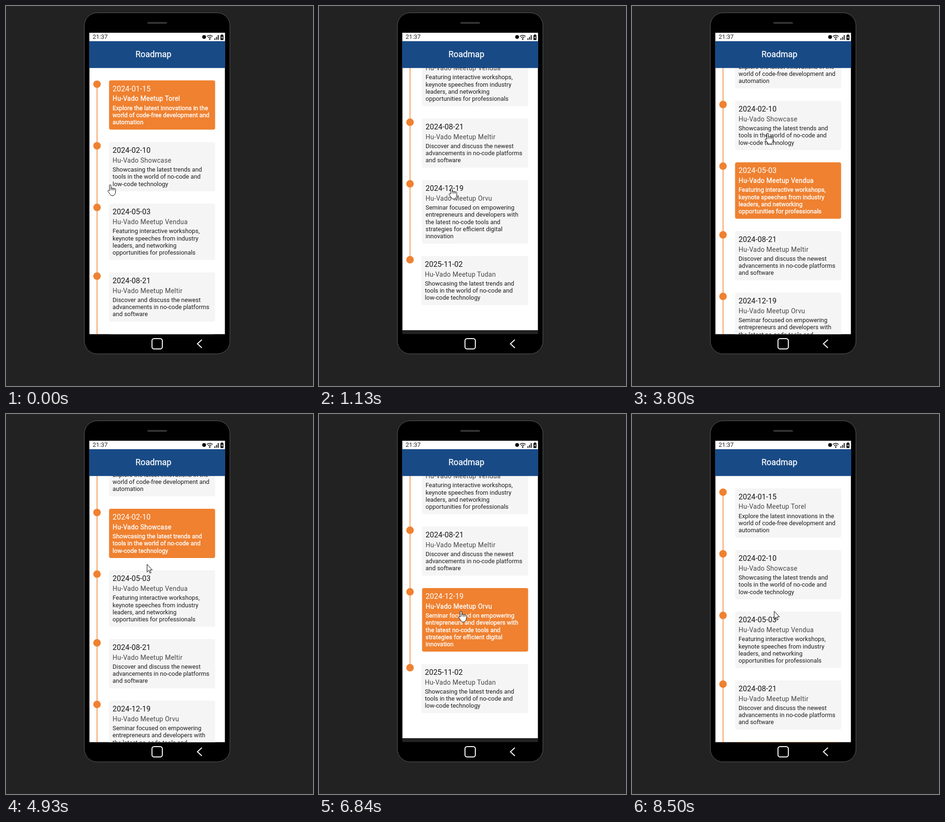
Animation, 654 px wide and 810 px high, one loop 8830 ms. Source, as an HTML page:

```html
<!DOCTYPE html>
<html lang="en">
<head>
<meta charset="utf-8">
<title>Roadmap</title>
<style>
  html, body { margin: 0; width: 100%; height: 100%; overflow: hidden; background: #222; }
  svg { display: block; font-family: Roboto, sans-serif; }
  .card rect { fill: #f5f5f5; }
  .date { font-size: 16px; fill: #181818; }
  .title { font-size: 14px; letter-spacing: .25px; fill: #484848; }
  .desc { font-size: 12.9px; fill: #1c1c1c; }
  .active rect { fill: #ef8130; }
  .active text { fill: #fff; }
  .active .title, .active .desc { stroke: #fff; stroke-width: .35px; }
  .cursor { fill: #fff; stroke: #000; stroke-linejoin: round; }
</style>
</head>
<body>
<svg width="654" height="810" viewBox="0 0 654 810">
  <defs><clipPath id="view"><rect x="177.5" y="132" width="289" height="567.4"/></clipPath></defs>

  <rect x="167" y="14.5" width="310" height="727" rx="27" stroke="#5c5c5c"/>
  <rect x="301" y="34" width="42" height="4" rx="2" fill="#333"/>
  <rect x="177.5" y="57" width="289" height="642.4" fill="#222"/>

  <g clip-path="url(#view)">
    <g id="page">
      <rect x="177.5" y="100" width="289" height="919" fill="#fff"/>
      <g id="timeline" fill="#ef8130"></g>
    </g>
  </g>

  <rect x="177.5" y="57" width="289" height="18.5" fill="#fff"/>
  <text x="184.5" y="70.3" font-size="12.9" fill="#222">21:37</text>
  <circle cx="422" cy="66" r="4"/>
  <g fill="none" stroke="#000" stroke-width="1.6">
    <path d="M428 65a8.6 8.6 0 0 1 12 0M430.6 67.7a5 5 0 0 1 6.8 0"/>
    <path d="M445 72v-3M448.5 72v-6M452 72v-10" stroke-width="1.8"/>
  </g>
  <circle cx="434" cy="70.2" r="1.5"/>
  <path d="M457 62h1.8v-1.5h2.6v1.5h1.8v10.5h-6.2z"/>
  <path d="M460.6 63.5l-2.2 4.2h1.5v3l2.2-4.2h-1.5z" fill="#fff"/>

  <rect x="177" y="75" width="290" height="57.2" fill="#184a86"/>
  <text x="275.8" y="109" font-size="17.9" fill="#fff" stroke="#fff" stroke-width=".3">Roadmap</text>

  <g fill="none" stroke="#fff" stroke-width="2">
    <rect x="311" y="709" width="22" height="22" rx="4.5"/>
    <path d="M417.3 711.2L407.8 720l9.5 8.8"/>
  </g>

  <g id="hand" class="cursor">
    <path d="M-1.7 13V1.9a1.7 1.7 0 0 1 3.4 0V8.2a1.6 1.6 0 0 1 3.3.5a1.6 1.6 0 0 1 3.2.6a1.6 1.6 0 0 1 3.3 1V16q0 2-1.7 4.4Q8 23.5 5 23.5Q1.6 23.5 0 20.8L-4.6 14.4c-1.2-2 1-3.4 2.9-1.4z"/>
    <path d="M1.7 8.2v3.6M5 8.7v3.3M8.2 9.3v3" fill="none"/>
  </g>
  <path id="arrow" class="cursor" d="M.5.5V16.8L4.2 13.3 6.7 19.2 9 18.2 6.5 12.4H11.6z"/>
</svg>

<script>
const events = [
  ["2024-01-15", "Hu-Vado Meetup Torel",
    "Explore the latest innovations in the|world of code-free development and|automation"],
  ["2024-02-10", "Hu-Vado Showcase",
    "Showcasing the latest trends and|tools in the world of no-code and|low-code technology"],
  ["2024-05-03", "Hu-Vado Meetup Vendua",
    "Featuring interactive workshops,|keynote speeches from industry|leaders, and networking|opportunities for professionals"],
  ["2024-08-21", "Hu-Vado Meetup Meltir",
    "Discover and discuss the newest|advancements in no-code platforms|and software"],
  ["2024-12-19", "Hu-Vado Meetup Orvu",
    "Seminar focused on empowering|entrepreneurs and developers with|the latest no-code tools and|strategies for efficient digital|innovation"],
  ["2025-11-02", "Hu-Vado Meetup Tudan",
    "Showcasing the latest trends and|tools in the world of no-code and|low-code technology"],
];
const LOOP = 8830, TICK = 66.5, LINE = 15.2, GAP = 26.3;
const $ = id => document.getElementById(id);

function buildTimeline() {
  let top = 158.6, dots = "", cards = "", lastDot;
  events.forEach(([date, title, desc], i) => {
    const lines = desc.split("|");
    const left = i === events.length - 1 ? 217.8 : 219.5;
    const height = 59.4 + LINE * lines.length;
    const text = (kind, dy, value) =>
      `<text class="${kind}" x="${left + 7.6}" y="${top + dy}">${value}</text>`;
    lastDot = top + 8.1;
    dots += `<circle cx="193.9" cy="${lastDot}" r="8"/>`;
    cards += `<g class="card"><rect x="${left}" y="${top}" width="${445.5 - left}" height="${height}" rx="4"/>`
      + text("date", 23, date) + text("title", 43.8, title)
      + lines.map((line, n) => text("desc", 63.2 + n * LINE, line)).join("") + "</g>";
    top += height + GAP;
  });
  $("timeline").innerHTML =
    `<rect x="193.2" y="167" width="1.5" height="${lastDot - 167}"/>` + dots + cards;
}

// Keys are [tick, ...values]; values are interpolated linearly between them.
const scrollKeys = [[0, 0], [5, 0], [9, 160], [12, 160], [17, 328], [24, 328], [29, 88],
  [74, 88], [79, 248], [82, 328], [111, 328], [117, 0]];
const cursorKeys = [[0, 222, 381], [6, 282, 388], [35, 282, 388], [36, 281.5, 391], [37, 281, 394],
  [46, 281, 394], [52, 289, 271], [67, 289, 271], [74, 300, 320], [79, 301.5, 345], [85, 302.5, 420]];
// Keys are [tick, value]; the value holds until the next key.
const activeKeys = [[0, 0], [43, 2], [65, 1], [97, 4]];
const shapeKeys = [[0, "hand"], [73, "arrow"], [76, "hand"], [99, "arrow"], [103, "hand"], [128, "arrow"]];

function tween(keys, tick) {
  const next = keys.findIndex(key => key[0] > tick);
  if (next < 0) return keys[keys.length - 1].slice(1);
  const from = keys[next - 1], to = keys[next];
  const part = (tick - from[0]) / (to[0] - from[0]);
  return from.slice(1).map((value, i) => value + (to[i + 1] - value) * part);
}
const held = (keys, tick) => keys.filter(key => key[0] <= tick).pop()[1];

buildTimeline();
const cards = [...document.querySelectorAll(".card")];

function render(now) {
  const tick = Math.floor((now % LOOP + 12) / TICK);
  const [scroll] = tween(scrollKeys, tick);
  const [x, y] = tween(cursorKeys, tick);
  const active = held(activeKeys, tick), shape = held(shapeKeys, tick);

  $("page").setAttribute("transform", `translate(0 ${-scroll})`);
  cards.forEach((card, i) => card.classList.toggle("active", i === active));
  for (const id of ["hand", "arrow"]) {
    $(id).setAttribute("transform", `translate(${x} ${y})`);
    $(id).style.display = id === shape ? "" : "none";
  }
}

const start = performance.now();
function frame() {
  render(performance.now() - start);
  requestAnimationFrame(frame);
}
frame();
</script>
</body>
</html>
```
